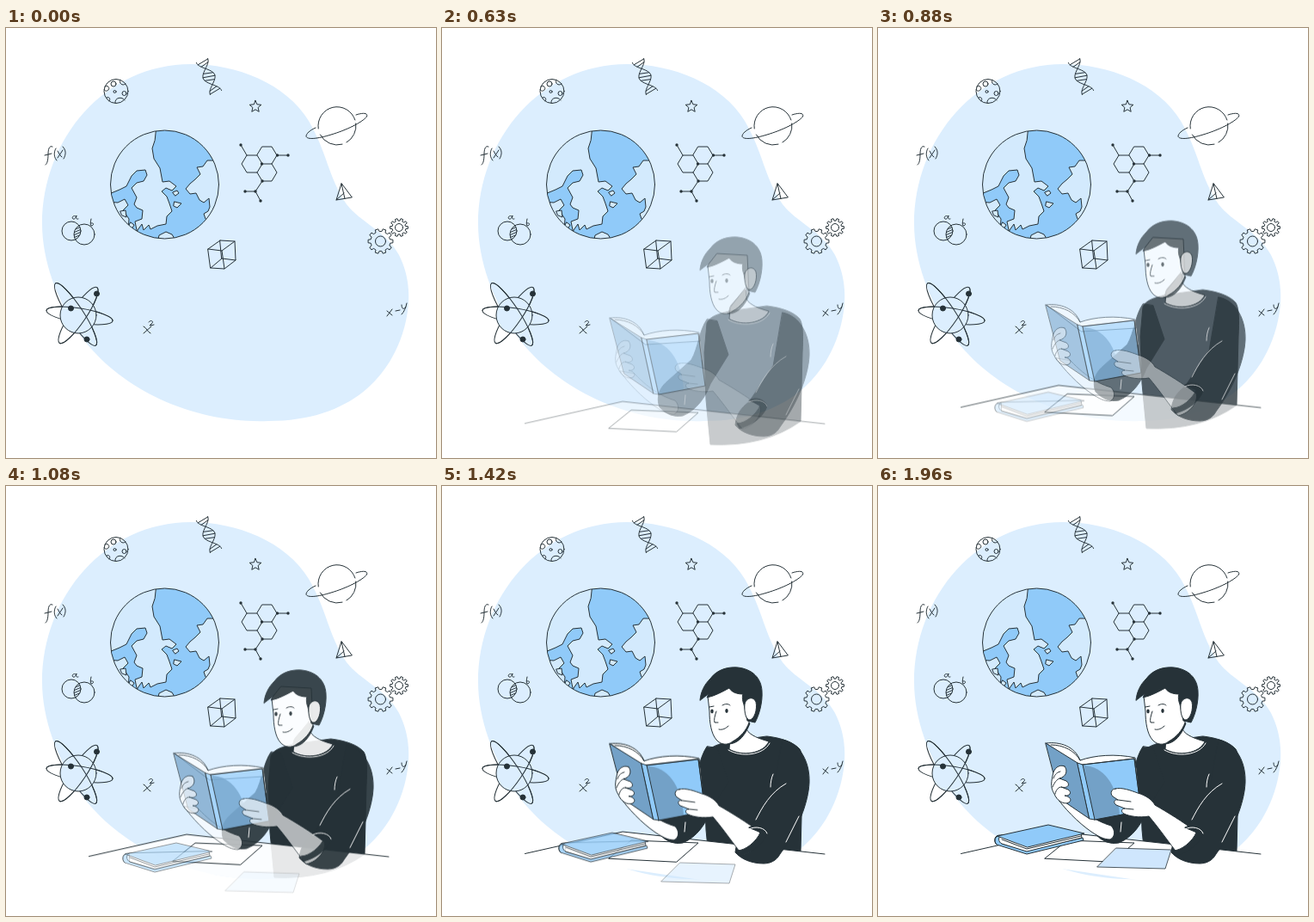
These frames come from a looping animation (500x500 px, 2000 ms). An HTML page:

```html
<!DOCTYPE html>
<html lang="en">
<head>
<meta charset="utf-8">
<title>Reading science</title>
<style>
html, body { margin: 0; width: 100%; height: 100%; overflow: hidden; background: #fff; }
svg { display: block; width: 100%; height: 100%; }
svg { fill: none; stroke: #263238; stroke-width: 1; stroke-linecap: round; stroke-linejoin: round; }
.ink { fill: #263238; stroke: #263238; }
.dots { fill: #263238; }
.white { fill: #fff; }
.sky { fill: #dceefe; }
.land { fill: #d3eafd; }
.blue { fill: #90caf9; }
.deep { fill: #73a1c7; }
.bare { stroke: none; }
.light { stroke: #fff; }

/* Every piece slides up on an eased curve and fades in on a straight one. */
.body > *, .sleeve > *, .book > *, .hand > * {
  animation: 2s cubic-bezier(.37, 0, .63, 1) infinite, 2s linear infinite;
}
.body > * { animation-name: bodyUp, bodyFade; }
.body > .soft, .soft > * { animation-name: bodyUp, softFade; }
.sleeve > * { animation-name: sleeveUp, sleeveFade; }
.book > * { animation-name: bookUp, bookFade; }
.hand > * { animation-name: bookUp, handFade; }
.stack > * { animation: stackUp 2s ease-out infinite; }
.sheet { animation: sheetUp 2s linear infinite; }

@keyframes bodyUp {
  0%, 3% { transform: translateY(60px); }
  63%, 100% { transform: none; }
}
@keyframes bodyFade {
  0%, 17% { opacity: 0; }
  52%, 100% { opacity: 1; }
}
@keyframes softFade {
  0%, 13% { opacity: 0; }
  59%, 100% { opacity: 1; }
}
@keyframes sleeveUp {
  0%, 3% { transform: translateY(60px); }
  68%, 100% { transform: none; }
}
@keyframes sleeveFade {
  0%, 15% { opacity: 0; }
  58%, 100% { opacity: 1; }
}
@keyframes bookUp {
  0%, 3% { transform: translateY(57px); }
  76%, 100% { transform: none; }
}
@keyframes bookFade {
  0%, 15% { opacity: 0; }
  70%, 100% { opacity: 1; }
}
@keyframes handFade {
  0%, 25% { opacity: 0; }
  70%, 100% { opacity: 1; }
}
@keyframes stackUp {
  0%, 33% { transform: translateY(40px); opacity: 0; }
  98%, 100% { transform: none; opacity: 1; }
}
@keyframes sheetUp {
  0%, 44% { transform: translateY(34px); opacity: 0; }
  98%, 100% { transform: none; opacity: 1; }
}
</style>
</head>
<body>
<svg viewBox="0 0 500 500">
  <defs>
    <clipPath id="globe"><circle cx="184.500" cy="182" r="63"/></clipPath>
    <clipPath id="left"><circle cx="76" cy="236" r="11"/></clipPath>
    <clipPath id="right"><circle cx="91" cy="240" r="12"/></clipPath>
  </defs>

  <path class="sky bare" d="M215 42C268 42 325 64 352 108C374 146 374 172 396 205C412 226 442 236 457 264C470 290 471 318 464 345C449 404 402 457 305 457C222 460 138 424 90 362C58 318 42 268 42 228C42 128 116 42 215 42Z"/>

  <!-- globe -->
  <g clip-path="url(#globe)">
    <circle class="land bare" cx="184.500" cy="182" r="63"/>
    <path class="blue" d="M175 117H250V154H234L229 161 222 162 226 170 220 176 214 181 209 187 214 193 221 192 225 200 230 203 236 198 237 208 235 213 230 216 232 222 250 230V250H199L193 240 186 237 178 241 176 250H150L153 235 158 228 160 235 166 229 168 234 176 230 186 228 187 219 193 213 190 204 187 196 181 190 186 186 193 189 198 184 190 178 182 179 179 163 172 152 170 140 173 131Z"/>
    <path class="blue" d="M115 195L132 188 140 184 146 172 152 166 162 165 164 171 160 178 152 180 146 186 152 197 149 205 152 209 159 212 158 222 150 225 153 240 142 236 143 222 136 212 142 206 138 199 130 203 115 202Z"/>
    <path class="land" d="M194 191L199 189 201 192 197 195ZM196 202L204 204 199 209 195 207ZM133 213L139 212 140 220 135 218ZM145 226L149 229 146 234 143 230Z"/>
  </g>
  <circle cx="184.500" cy="182" r="63"/>

  <!-- moon -->
  <circle cx="128" cy="73.500" r="14"/>
  <circle cx="125" cy="65" r="3"/><circle cx="126.500" cy="74" r="1.500"/><circle cx="137.500" cy="76" r="2.500"/>
  <path d="M115 68C119 66 121 70 119 72C117 74 115 73 114 72M117 81C120 79 122 83 120 85M127 87C126 81 135 79 138 84M133 60.500C131 64 135 68 139 65"/>

  <path id="dna"/>
  <path id="star"/>

  <!-- ringed planet -->
  <path d="M363.200 117A22 22 0 0 1 405.900 107M406.800 111A22 22 0 0 1 396 133M391 135.200A22 22 0 0 1 365.400 124"/>
  <path d="M407 101C416 98 421 99 419.500 103C414 110 395 119 378 124C362 129 350 130 349 126C349 123 353 119 360 116"/>

  <!-- molecule -->
  <path d="M298 138H309L315 148 309 158H298L292 148ZM292 148H280L274 158 280 168H292L298 158M309 158L315 168 309 178H298L292 168M280 148L273 136M315 148H328M298 178L290 190H278M290 190L296 201"/>
  <g class="dots bare">
    <circle cx="273" cy="136" r="1.700"/><circle cx="297.500" cy="158" r="1.700"/><circle cx="315.500" cy="148" r="1.700"/><circle cx="328" cy="148" r="1.700"/>
    <circle cx="298" cy="178" r="1.700"/><circle cx="290" cy="190" r="1.700"/><circle cx="278" cy="190" r="1.700"/><circle cx="296" cy="201" r="1.700"/>
  </g>

  <path d="M390 181L384 200 402 197ZM390 181L394 198.500M384 200L393 192"/>
  <path d="M235 257L251 259 254 280 238 279ZM249 247L266 248 267 270 251 268ZM235 257L249 247M251 259L266 248M254 280L267 270M238 279L251 268"/>

  <path id="gearBig"/><circle cx="435.500" cy="248" r="6"/>
  <path id="gearSmall"/><circle cx="457" cy="232" r="4.500"/>

  <!-- overlapping sets -->
  <circle cx="76" cy="236" r="11"/><circle cx="91" cy="240" r="12"/>
  <g clip-path="url(#left)"><path id="hatch" clip-path="url(#right)"/></g>

  <!-- handwriting -->
  <path d="M81 219C78 217 76 221 78 222C80 223 82 219 82 218C81 221 82 223 84 222"/>
  <path d="M99 222C98 226 98 229 99 230C102 230 103 226 99 227"/>
  <path d="M54 138C50 136 49 142 49 147C49 153 48 158 46 159M45 148L53 146M58 140C55 145 56 151 59 154M60 143C62 146 63 149 65 150M66 142L60 151M66 138C70 142 70 147 67 152"/>
  <path d="M160 347C163 348 165 354 168 355M169 347L160 355M166 342C168 339 172 341 170 343L167 346 172 345"/>
  <path d="M443 329L449 334M449 327L443 335M453 329L458 328M460 322C460 327 463 328 465 324M466 320C465 325 463 330 460 333"/>

  <!-- atom: whole orbits behind the core, near halves in front -->
  <ellipse cx="85.500" cy="334.500" rx="39" ry="8.500" transform="rotate(9 85.500 334.500)"/>
  <ellipse cx="81" cy="333" rx="43" ry="9" transform="rotate(57 81 333)"/>
  <ellipse cx="84" cy="334" rx="39" ry="9" transform="rotate(-56 84 334)"/>
  <circle class="sky" cx="84" cy="334" r="21"/>
  <path d="M46.500 334.500A39 8.500 0 0 1 124.500 334.500" transform="rotate(9 85.500 334.500)"/>
  <path d="M38 333A43 9 0 0 1 124 333" transform="rotate(57 81 333)"/>
  <path d="M45 334A39 9 0 0 0 123 334" transform="rotate(-56 84 334)"/>
  <g class="dots"><circle cx="105.500" cy="309" r="3"/><circle cx="75.500" cy="326" r="3"/><circle cx="94" cy="362" r="3"/></g>

  <!-- reader -->
  <g class="body">
    <path class="ink" d="M334 297C322 300 311 303 308 311L305 345 307 400 312 452Q375 455 417 425L419 345C420 328 420 312 416 306C409 298 395 293 378 291Z"/>
  </g>
  <g class="soft body">
    <path class="white" d="M353 270L354 283C358 290 369 294 380 297C374 311 349 315 334 306L335 293Z"/>
    <path class="ink" d="M333 300C343 300 352 292 358 276L352 272 336 290Z"/>
    <path class="light" d="M333 307C348 316 374 313 381 299"/>
    <path class="light" d="M382 350C382 345 383 339 385 335"/>
    <path class="white" d="M309 244L311 262C311 275 313 288 319 295C324 301 332 302 338 297C347 292 354 284 357 275L355 232 320 230Z"/>
    <path class="ink" d="M300 249C301 239 305 231 312 224C320 213 333 210 344 211C361 213 371 223 372 238C373 251 369 266 364 275L355 273 351 254C349 249 349 244 350 242C343 242 337 240 334 235C326 239 318 244 308 246L311 241Z"/>
    <path class="white" d="M352 253C354 246 362 244 365 251C367 260 363 271 358 272C354 272 351 265 352 253Z"/>
    <path d="M319 262C317 268 316 272 317 275L321 275M322 283C326 284 330 282 333 279M311 257L316 256M326 255C329 253 333 253 335 255"/>
    <g class="dots bare"><ellipse cx="314" cy="262" rx="1.700" ry="2.400"/><ellipse cx="331" cy="261.500" rx="1.700" ry="2.400"/></g>
  </g>

  <!-- table -->
  <g class="body">
    <path class="soft white bare" d="M96 427.500L210 402 446 428 420 444 340 463 297 457.500Z"/>
    <path d="M96.500 427.500L210 402 445 428"/>
    <path class="white" d="M194 433L220 412 298 415 273 437Z"/>
  </g>

  <!-- far arm -->
  <g class="sleeve">
    <path class="ink" d="M308 303C299 316 298 336 290 350L262 375C250 385 250 397 253 405Q265 418 280 415C297 408 307 392 312 378L333 344 320 305Z"/>
    <path class="light" d="M299 322L302 350M283 391L282 402"/>
  </g>
  <g class="hand">
    <path class="white" d="M207 361C216 374 232 391 248 402C257 408 263 411 270 411C276 408 276 400 271 395C258 391 243 384 224 364Z"/>
  </g>

  <!-- open book -->
  <g class="book">
    <path class="white" d="M196 299C212 297 229 303 235 319C252 313 276 311 299 316L300 326 237 330Z"/>
    <path class="deep" d="M195 299L232 322 246 387 212 364Z"/>
    <path class="blue" d="M238 324L298 317 306 378 252 388Z"/>
    <path class="deep bare" d="M239 325C262 326 278 346 281 382L252 388Z"/>
    <path class="blue" d="M232 322L238 324 252 388 246 387Z"/>
    <path d="M201 301C216 301 229 308 235 319M238 324L298 317 306 378 252 388"/>
  </g>

  <!-- near arm -->
  <g class="sleeve">
    <path class="ink" d="M396 295C417 299 428 322 427 345C426 368 414 400 393 428C389 436 381 439 374 439C360 439 348 434 341 426C342 415 347 406 357 399L385 357Z"/>
  </g>
  <g class="hand">
    <path class="white" d="M217 326C211 323 204 328 203 337C201 346 201 352 205 358C208 366 216 371 222 368C226 365 223 361 217 360C223 361 226 356 221 353L213 350C221 352 224 347 219 343L211 340C219 338 221 331 217 326Z"/>
    <path d="M204 340C206 334 209 333 212 332M203 350C205 345 208 341 211 340M206 358C207 353 210 350 213 350"/>
    <path class="white" d="M276 352C283 350 294 354 302 357C312 360 319 365 322 371C336 379 354 390 370 402C373 411 363 425 349 428C340 417 327 398 315 384C304 386 292 384 286 381C282 379 283 375 287 375L277 371C273 368 275 364 279 365L273 361C269 357 272 352 276 352Z"/>
    <path d="M279 365L294 367M287 375L297 376"/>
  </g>
  <g class="sleeve">
    <path class="ink" d="M357 397C366 392 376 397 378 404C374 416 361 426 346 430L343 424C353 424 366 413 370 403Z"/>
    <path class="light" d="M357 399C364 395 376 397 378 404M365 388C372 374 382 356 400 346M415 384L400 414"/>
  </g>

  <!-- closed book -->
  <g class="stack">
    <path class="blue" d="M143 406C135 405 134 413 138 417L173 428 239 412 238 409 173 424 144 416Z"/>
    <path class="white" d="M143 406C139 409 140 414 144 416L173 425 237 409 236 404Z"/>
    <path class="blue" d="M139 407L198 394 240 404 174 420Z"/>
    <path d="M139 407C135 409 135 415 138 417M144 411L173 422 236 407"/>
  </g>

  <path class="sheet" fill="#cfe6fd" stroke-width=".8" d="M277 421L341 423 334 445 255 443Z"/>
</svg>
<script>
const setPath = (id, d) => document.getElementById(id).setAttribute('d', d);
const polygon = points => 'M' + points.map(p => p.map(v => v.toFixed(1))).join('L') + 'Z';
const polar = (x, y, r, a) => [x + r * Math.cos(a), y + r * Math.sin(a)];

function gear(x, y, outer, inner, teeth) {
  const points = [];
  for (let i = 0; i < teeth; i++) {
    const turn = offset => (i + offset) / teeth * 2 * Math.PI;
    points.push(polar(x, y, inner, turn(-.3)), polar(x, y, outer, turn(-.2)),
      polar(x, y, outer, turn(.2)), polar(x, y, inner, turn(.3)));
  }
  return polygon(points);
}

function helix(turns) {
  const at = (s, side) => {
    const w = side * 7 * Math.cos(2 * Math.PI * turns * s);
    return [228 + 16 * s + .94 * w, 38 + 37 * s - .35 * w];
  };
  const strand = side => 'M' + Array.from({ length: 31 }, (_, i) => at(i / 30, side)).join('L');
  const rungs = [.04, .13, .4, .5, .6, .87, .96].map(s => `M${at(s - .03, 1)}L${at(s + .03, -1)}`);
  return strand(1) + strand(-1) + rungs.join('');
}

setPath('gearBig', gear(435.5, 248, 14.5, 11.5, 10));
setPath('gearSmall', gear(457, 232, 10.5, 8, 10));
setPath('dna', helix(1));
setPath('star', polygon(Array.from({ length: 10 }, (_, i) =>
  polar(290, 91.5, i % 2 ? 3.3 : 7.2, (i - 2.5) * Math.PI / 5))));
setPath('hatch', Array.from({ length: 9 }, (_, i) => `M76 ${230 + 3 * i}l14 -6`).join(''));
</script>
</body>
</html>
```
